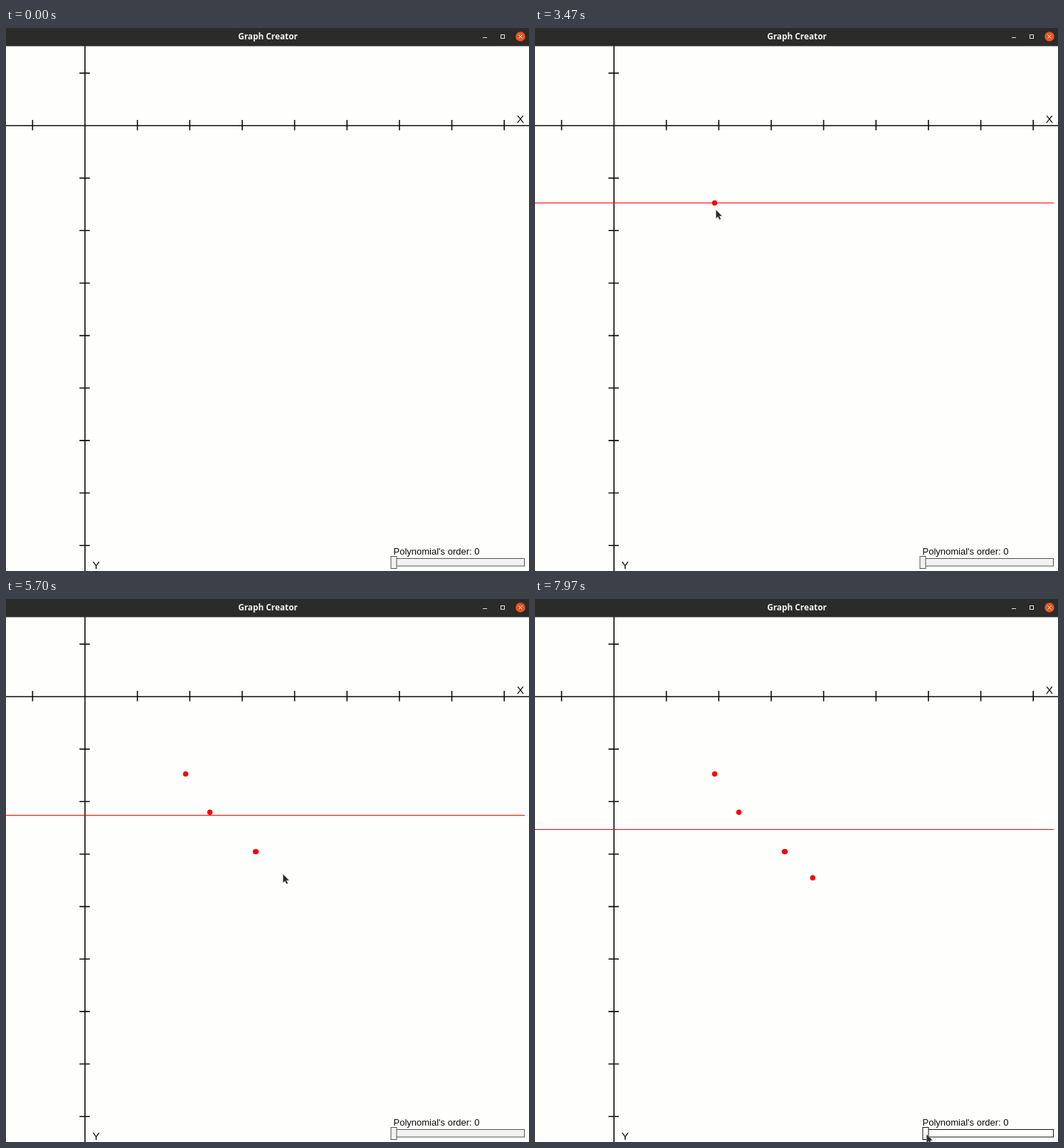
An HTML page for the animation above (8 s loop, 735 px wide and 762 px high).

```html
<!DOCTYPE html>
<html lang="en">
<head>
<meta charset="utf-8">
<title>Graph Creator</title>
<style>
  html, body { margin: 0; width: 100%; height: 100%; overflow: hidden; background: #fefefd; }
  svg { display: block; }
  .ui { font-family: "Liberation Sans", Arial, sans-serif; fill: #0a0a0a; }
  .title { font: bold 11.8px "Open Sans", "Noto Sans", sans-serif; fill: #f4f4f1; }
  .ink { stroke: #0c0c0c; stroke-width: 1.6; }
  .slider rect { fill: #f2f2f2; stroke: #555; }
  .slider.hover rect { fill: #fefefd; stroke: #111; }
</style>
</head>
<body>
<svg width="735" height="762" viewBox="0 0 735 762">
  <rect width="735" height="762" fill="#fefefd"/>
  <g id="axes" class="ink"></g>
  <g class="ui">
    <text x="717.7" y="133" font-size="15.5">X</text>
    <text x="121.5" y="759" font-size="15.5">Y</text>
    <text x="544.5" y="738.5" font-size="13">Polynomial's order: 0</text>
  </g>
  <line id="fit" x1="0" x2="729" stroke="#f00"/>
  <g id="dots" fill="#f90006"></g>
  <g id="slider" class="slider">
    <rect x="545.5" y="744.5" width="183" height="10.5"/>
    <rect id="knob" y="741.5" width="8" height="17"/>
  </g>
  <rect width="735" height="25.5" fill="#2b2b29"/>
  <text class="title" x="368" y="16" text-anchor="middle">Graph Creator</text>
  <g fill="none" stroke="#e6e6e2">
    <path d="M670 13.5h6"/>
    <rect x="695.5" y="9.5" width="5" height="5"/>
    <circle cx="723" cy="12" r="6.8" fill="#e95420" stroke="none"/>
    <path d="M720.5 9.5l5 5m0-5l-5 5" stroke="#fff"/>
  </g>
  <path id="cursor" d="M.5 .5V12L3.2 9.4 5.2 13.8 7 13 5 8.7H8.6Z"
        fill="#2b2b2b" stroke="#d4d4d4" stroke-width="1" paint-order="stroke"/>
</svg>
<script>
const LOOP = 8000, FPS = 30;
const $ = id => document.getElementById(id);

function add(parent, tag, attrs) {
  const el = document.createElementNS("http://www.w3.org/2000/svg", tag);
  for (const k in attrs) el.setAttribute(k, attrs[k]);
  parent.append(el);
  return el;
}

// Axes with evenly spaced ticks
const ORIGIN = { x: 111, y: 137 }, UNIT = 73.65;
add($("axes"), "path", { d: `M${ORIGIN.x} 25V762M0 ${ORIGIN.y}H735` });
for (let k = -1; k <= 8; k++) {
  if (!k) continue;
  const x = ORIGIN.x + UNIT * k, y = ORIGIN.y + UNIT * k;
  add($("axes"), "path", { d: `M${x} 129v14.5M103.3 ${y}h14.5` });
}

// Cursor moves: start, end, target x, target y, easing
const smooth = p => p * p * (3 - 2 * p);
const easeOut = p => 1 - (1 - p) ** 2;
const easeIn = p => p ** 1.5;
const linear = p => p;
const START = [50, 413];
const MOVES = [
  [100, 900, 422, 358, easeOut],
  [900, 935, 424, 358, linear],
  [935, 1033, 415, 373, smooth],
  [1133, 1333, 393, 399, smooth],
  [1700, 1767, 391, 399, linear],
  [1900, 2033, 386, 394, smooth],
  [2367, 2833, 252, 244, smooth],
  [3200, 3333, 254, 255, smooth],
  [3433, 3967, 286, 298, smooth],
  [4200, 4867, 351, 353, smooth],
  [5067, 5700, 389, 386, smooth],
  [5700, 5800, 389.5, 388, linear],
  [5800, 5833, 390, 390, linear],
  [6267, 6967, 532, 699, easeIn],
  [6967, 7100, 550, 738, easeOut],
  [7100, 7533, 546, 749, easeOut],
  [7767, 7967, 550.5, 751, smooth]
];

function cursorAt(t) {
  let [x, y] = START;
  for (const [from, to, tx, ty, ease] of MOVES) {
    if (t <= from) break;
    const p = ease(Math.min(1, (t - from) / (to - from)));
    x += (tx - x) * p;
    y += (ty - y) * p;
  }
  return [x, y];
}

// A held press adds one sample per frame: time, x, y, sample count
const PRESSES = [
  [3100, 252.5, 245.5, 4],
  [4133, 286.5, 299.2, 5],
  [5000, 351, 354.5, 5],
  [6000, 390.3, 391.3, 4]
];
const dots = PRESSES.map(([, x, y], i) =>
  add($("dots"), "ellipse", { cx: x, cy: y, rx: i === 2 ? 4.2 : 3.7, ry: 3.8 }));

function samples(t, [time, , , count]) {
  const frames = Math.round((t - time) * FPS / 1000);
  return frames < 0 ? 0 : Math.min(count, 2 + frames);
}

const show = (el, on) => { el.style.display = on ? "" : "none"; };

function draw(t) {
  let total = 0, sum = 0;
  PRESSES.forEach((press, i) => {
    const n = samples(t, press);
    show(dots[i], n);
    total += n;
    sum += n * press[2];
  });
  show($("fit"), total);
  if (total) {
    const y = Math.floor(sum / total) + 0.5;
    $("fit").setAttribute("y1", y);
    $("fit").setAttribute("y2", y);
  }

  const [x, y] = cursorAt(t);
  show($("cursor"), t >= 95);
  $("cursor").setAttribute("transform", `translate(${Math.round(x)} ${Math.round(y)})`);

  $("slider").classList.toggle("hover", t >= 7120);
  const drag = t > 7767 ? Math.round(x) - 546 : 0;
  $("knob").setAttribute("x", 541 + drag);
}

const begin = performance.now();
function tick() {
  const t = (performance.now() - begin) % LOOP;
  draw(Math.floor((t + 4) * FPS / 1000) * 1000 / FPS);
  requestAnimationFrame(tick);
}
tick();
</script>
</body>
</html>
```
